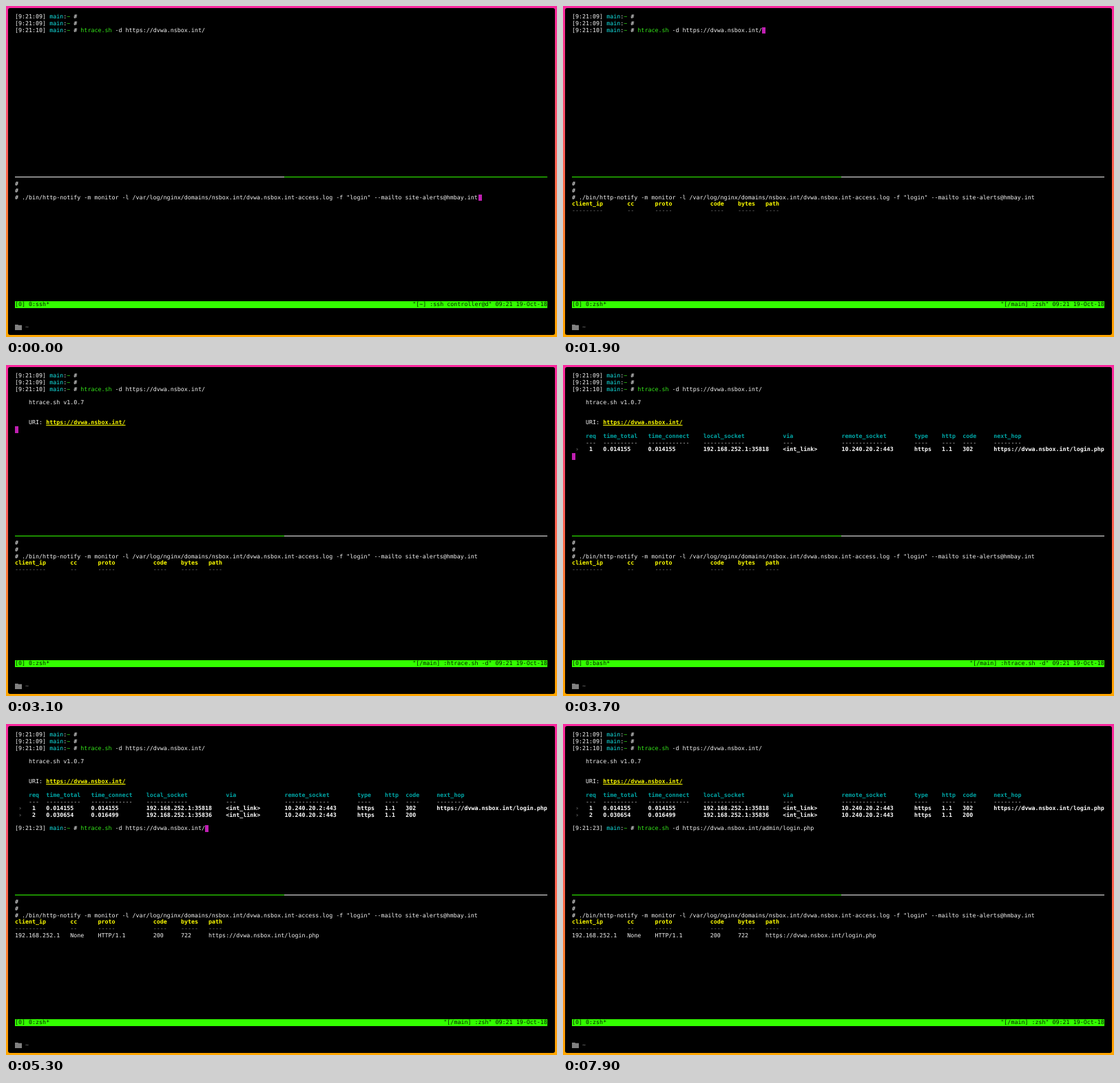
An HTML page that plays this animation: 800 by 481 pixels, repeating every 8000 ms.

```html
<!DOCTYPE html>
<html lang="en">
<head>
<meta charset="utf-8">
<title>Terminal session</title>
<style>
html, body { margin: 0; width: 100%; height: 100%; overflow: hidden; }
body { position: relative; background: linear-gradient(#f9289f, #ffa600); }
#term {
  position: absolute; left: 3px; top: 3px; width: 794px; height: 475px;
  border-radius: 3px; background: #000;
}
#screen, #screen * { position: absolute; }
#screen {
  left: 0; top: 0; color: #f4f4f4; white-space: pre;
  font: 8.337px/9.72px "DejaVu Sans Mono", monospace;
  text-rendering: geometricPrecision;
}
#screen .line { top: 248px; height: 1px; }
#screen .bar { left: 13px; width: 773px; height: 9.72px; background: #3f0; }
#screen .cursor { width: 5.02px; height: 9.72px; background: #c01fb2; }
.ink { color: #041a00; }
.cyan { color: #14e6e6; }
.green { color: #35e81a; }
.gray { color: #808080; }
.pale { color: #d8d8d8; }
.bold, .teal, .yellow, .link { font-weight: bold; }
.bold { color: #fff; }
.teal { color: #00a5a5; }
.yellow, .link { color: #ff0; }
.link { text-decoration: underline; }
#folder {
  position: absolute; left: 13px; top: 462.5px; width: 10px; height: 8.5px; background: #808080;
  clip-path: polygon(0 0, 40% 0, 50% 15%, 100% 15%, 100% 100%, 0 100%);
}
</style>
</head>
<body>
<div id="term"></div>
<div id="screen"></div>
<div id="folder"></div>
<script>
const LOOP = 8000, X0 = 13, Y0 = 11.3, CELL = 5.019, ROW = 9.72, COLS = 154;
const SITE = 'https://dvwa.nsbox.int/', LOGIN = SITE + 'login.php', TAIL = 'admin/login.php';
const LOG = '/var/log/nginx/domains/nsbox.int/dvwa.nsbox.int-access.log';
const NOTIFY = `# ./bin/http-notify -m monitor -l ${LOG} -f "login" --mailto site-alerts@hmbay.int`;
const TOP_COLS = [4, 9, 22, 38, 61, 78, 99, 107, 113, 122];
const TOP_HEAD = ['req', 'time_total', 'time_connect', 'local_socket', 'via',
  'remote_socket', 'type', 'http', 'code', 'next_hop'];
const LOW_COLS = [0, 16, 24, 40, 48, 56];
const LOW_HEAD = ['client_ip', 'cc', 'proto', 'code', 'bytes', 'path'];

// Each step: start time, then its values; a cursor without a row is hidden.
const CURSOR = [
  [0, 27, 134], [400, 27, 134, .5], [500], [800, 28, 0], [900, 30, 0], [1600],
  [1900, 2, 55], [2600, 2, 55, .5], [2700], [3000, 3, 0], [3100, 8, 0], [3700, 12, 0],
  [3900, 13, 0], [4100, 14, 0], [4200, 14, 19], [4900], [5300, 14, 55], [6100],
  [6200, 14, 56], [6300, 14, 57], [6400, 14, 58], [7100], [7200, 14, 70], [7900]
];
const SHELL = [[0, 'ssh'], [1900, 'zsh'], [3700, 'bash'], [5300, 'zsh']];
const TITLE = [[0, '[~] :ssh controller@d'], [1900, '[/main] :zsh'],
  [3100, '[/main] :htrace.sh -d'], [4200, '[/main] :zsh']];
const TYPED = [[0, 0], [6200, 1], [6300, 2], [6400, 3], [7200, TAIL.length]];

const screen = document.getElementById('screen');
const at = (steps, t) => steps.findLast(s => s[0] <= t).slice(1);
const place = (row, col) => `left:${X0 + col * CELL}px;top:${Y0 + row * ROW}px`;
const put = (row, col, text, cls = '') =>
  `<span class="${cls}" style="${place(row, col)}">${String(text).replace(/</g, '&lt;')}</span>`;
const cells = (row, cols, texts, cls) => texts.map((s, i) => put(row, cols[i], s, cls)).join('');
const header = (row, cols, names, cls, rule) =>
  cells(row, cols, names, cls) + cells(row + 1, cols, names.map(s => '-'.repeat(s.length)), rule);
const prompt = (row, time) => put(row, 0, `[${time}]`) + put(row, 10, 'main', 'cyan') +
  put(row, 14, ':') + put(row, 15, '~', 'green') + put(row, 17, '#');
const command = row => put(row, 19, 'htrace.sh', 'green') + put(row, 29, '-d ' + SITE);
const request = (row, n, total, connect, port, code) => put(row, 1, '›', 'gray') +
  cells(row, TOP_COLS, [' ' + n, total, connect, '192.168.252.1:' + port, '<int_link>',
    '10.240.20.2:443', 'https', '1.1', code, n === 1 ? LOGIN : ''], 'bold');
const line = (from, to, color) => `<i class="line" style="left:${X0 + from * CELL}px;` +
  `width:${(to - from) * CELL}px;background:${color}"></i>`;

function topPane(t) {
  let out = prompt(0, '9:21:09') + prompt(1, '9:21:09') + prompt(2, '9:21:10') + command(2);
  if (t >= 3100) out += put(4, 4, 'htrace.sh v1.0.7') + put(7, 4, 'URI:') + put(7, 9, SITE, 'link');
  if (t >= 3700) out += header(9, TOP_COLS, TOP_HEAD, 'teal', 'pale') +
    request(11, 1, '0.014155', '0.014155', 35818, 302);
  if (t >= 3900) out += request(12, 2, '0.030654', '0.016499', 35836, 200);
  if (t >= 4200) out += prompt(14, '9:21:23');
  if (t >= 5300) {
    const [n] = at(TYPED, t);
    out += command(14) + put(14, 55, TAIL.slice(0, n));
    if (n) out += put(14, 55 + n, TAIL.slice(n), 'gray');
  }
  return out;
}

function lowPane(t) {
  let out = put(25, 0, '#') + put(26, 0, '#') + put(27, 0, NOTIFY);
  if (t >= 900) out += header(28, LOW_COLS, LOW_HEAD, 'yellow', 'gray');
  if (t >= 3900) out += cells(30, LOW_COLS, ['192.168.252.1', 'None', 'HTTP/1.1', 200, 722, LOGIN]);
  return out;
}

function status(t) {
  const right = `"${at(TITLE, t)}" 09:21 19-Oct-18`;
  return `<i class="bar" style="${place(43, 0)}"></i>` +
    put(43, 0, `[0] 0:${at(SHELL, t)}*`, 'ink') + put(43, COLS - right.length, right, 'ink');
}

function cursor(t) {
  const [row, col, alpha = 1] = at(CURSOR, t);
  return row === undefined ? '' : `<i class="cursor" style="${place(row, col)};opacity:${alpha}"></i>`;
}

function view(t) {
  const ends = t < 1900 ? ['#f4f4f4', '#3f0'] : ['#3f0', '#f4f4f4'];
  return cursor(t) + topPane(t) + line(0, 78, ends[0]) + line(78, COLS, ends[1]) +
    lowPane(t) + status(t) + put(46.4, 3, '~', 'gray');
}

let shown, start;
function draw(now) {
  start ??= now;
  const html = view((now - start) % LOOP);
  if (html !== shown) screen.innerHTML = shown = html;
  requestAnimationFrame(draw);
}
requestAnimationFrame(draw);
</script>
</body>
</html>
```
